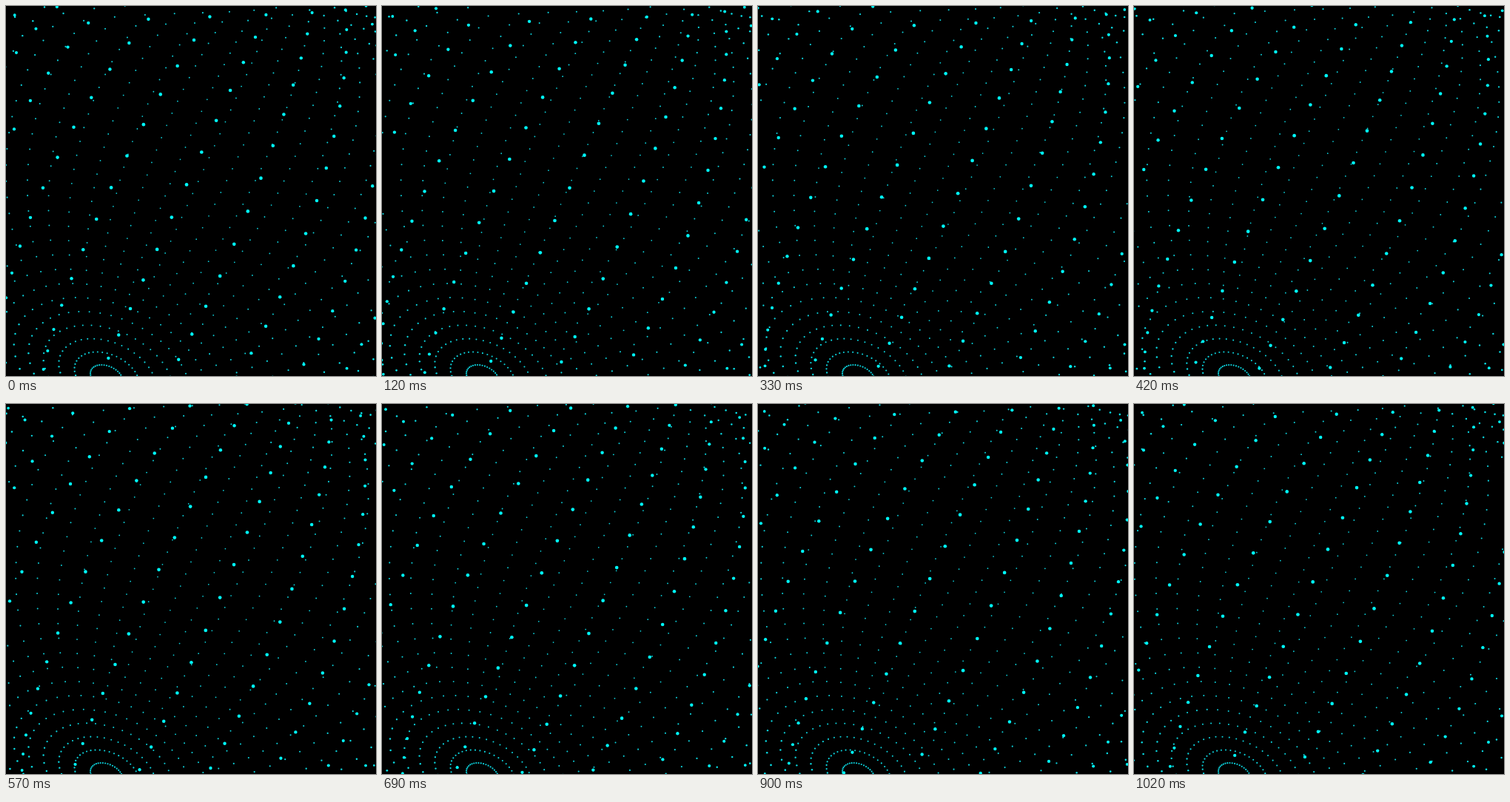
These frames come from a looping animation (500x500 px, 1050 ms). An HTML page with a canvas:

```html
<!DOCTYPE html>
<html>
<head>
<meta charset="utf-8">
<style>
html, body { margin: 0; width: 100%; height: 100%; overflow: hidden; background: #000; }
canvas { display: block; width: 500px; height: 500px; }
</style>
</head>
<body>
<canvas id="stage" width="500" height="500"></canvas>
<script>
const ctx = document.getElementById('stage').getContext('2d');
const RAD = Math.PI / 180;
const LOOP = 1050, TICK = 30;
const RINGS = 39, SPOKES = 40;     // latitude bands, points per ring
const FOCAL = 694.8, DIST = 2.15;  // camera, in sphere radii
const CX = 250.1, CY = 250.2;
const tilt = 15.64 * RAD, roll = 24.4 * RAD;
const ct = Math.cos(tilt), st = Math.sin(tilt);
const cr = Math.cos(roll), sr = Math.sin(roll);

// Point on the unit sphere, projected to the screen.
function project(theta, phi) {
  const axis = Math.cos(theta);
  const out = Math.sin(theta) * Math.cos(phi);
  const side = Math.sin(theta) * Math.sin(phi);
  const depth = DIST + st * axis - ct * out;
  const k = FOCAL / depth;
  const u = k * (ct * axis + st * out);
  const v = k * side;
  return { x: CX - sr * u + cr * v, y: CY + cr * u + sr * v, depth };
}

function drawDot({ x, y, depth }) {
  if (x < -4 || x > 504 || y < -4 || y > 504) return;
  const near = Math.max(0, Math.min(1, (2.4 - depth) / 0.9));
  const mix = (a, b) => Math.round(a + (b - a) * near);
  ctx.fillStyle = `rgb(${mix(12, 0)},${mix(208, 250)},${mix(218, 252)})`;
  ctx.beginPath();
  ctx.arc(x, y, 2.72 / depth, 0, 2 * Math.PI);
  ctx.fill();
}

function draw(ms) {
  const phase = Math.floor((ms % LOOP) / TICK) * TICK / LOOP - 0.1;
  ctx.fillStyle = '#000';
  ctx.fillRect(0, 0, 500, 500);
  const dots = [];
  for (let i = 1; i < RINGS; i++) {
    for (let j = 0; j < SPOKES; j++) {
      dots.push(project(i * Math.PI / RINGS, (j + phase) * 2 * Math.PI / SPOKES));
    }
  }
  dots.sort((a, b) => b.depth - a.depth).forEach(drawDot);
}

const start = performance.now();
function loop() {
  draw(performance.now() - start);
  requestAnimationFrame(loop);
}
loop();
</script>
</body>
</html>
```
